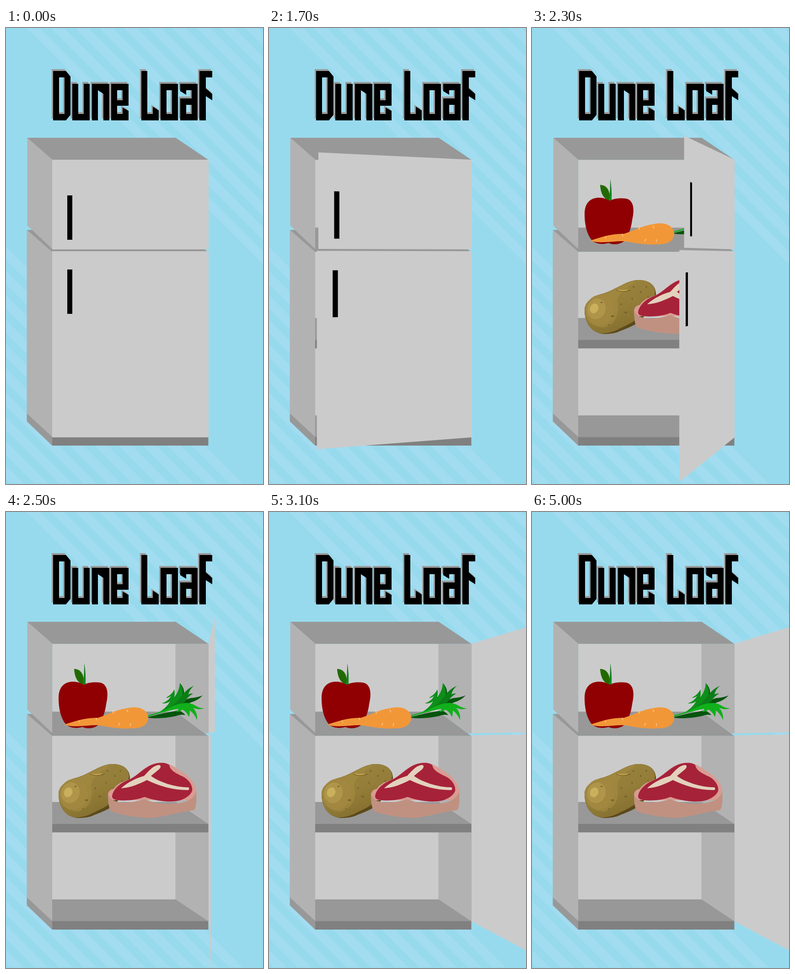
An HTML page without scripts that plays this animation: 562 px wide and 997 px high, repeating every 5.1 s.

```html
<!DOCTYPE html>
<html lang="en">
<head>
<meta charset="utf-8">
<title>Dune Loaf</title>
<style>
  html, body { margin: 0; width: 100%; height: 100%; overflow: hidden; background: #98daed; }
  .stage {
    position: relative; width: 562px; height: 997px; overflow: hidden;
    perspective: 1600px; perspective-origin: 281px 498.5px;
  }
  svg { position: absolute; left: 0; top: 0; display: block; }
  .door {
    position: absolute; left: 101px; width: 342px; background: #cbcbcb;
    transform-origin: 100% 50%;
  }
  .door i { position: absolute; left: 32.5px; width: 11.5px; height: 97px; background: #000; }
  .upper { top: 288px; height: 196px; animation: upper 5.1s infinite; }
  .upper i { top: 78px; }
  .lower { top: 488px; height: 407px; animation: lower 5.1s infinite; }
  .lower i { top: 40px; }

  /* doors swing at ten poses a second, then jump shut with the loop */
  @keyframes upper {
    0% { transform: rotateY(0deg); animation-timing-function: step-end; }
    29.41% { transform: rotateY(2.6deg); animation-timing-function: steps(12, end); }
    52.94% { transform: rotateY(102.7deg); animation-timing-function: step-end; }
    54.9%, 100% { transform: rotateY(108.5deg); }
  }
  @keyframes lower {
    0% { transform: rotateY(0deg); animation-timing-function: step-end; }
    29.41% { transform: rotateY(-.3deg); animation-timing-function: steps(12, end); }
    52.94% { transform: rotateY(101.9deg); animation-timing-function: step-end; }
    54.9%, 100% { transform: rotateY(110deg); }
  }

  .back { fill: #cbcbcb; }
  .side { fill: #b2b2b2; }
  .floor { fill: #989898; }
  .edge { fill: #808080; }
</style>
</head>
<body>
<div class="stage">
  <svg width="562" height="997" viewBox="0 0 562 997">
    <defs>
      <pattern id="rays" width="53.2" height="60" x="45" patternUnits="userSpaceOnUse" patternTransform="skewX(45)">
        <rect width="28.5" height="60" fill="#a2dcf0"/>
      </pattern>
      <linearGradient id="skin" x1="0" y1="0" x2=".55" y2="1">
        <stop offset="0" stop-color="#9c8541"/>
        <stop offset=".6" stop-color="#947d38"/>
        <stop offset="1" stop-color="#836e2f"/>
      </linearGradient>
      <linearGradient id="stem" x1="0" y1="0" x2="0" y2="1">
        <stop offset="0" stop-color="#0a6a1c"/>
        <stop offset="1" stop-color="#178a22"/>
      </linearGradient>
      <path id="D" d="M0 0H28L38 12V96L28 108H0ZM13 14V94H25V14Z"/>
      <path id="u" d="M0 28H13V94H25V28H38V108H0Z"/>
      <path id="n" d="M0 28H38V108H25V50L13 42V108H0Z"/>
      <path id="e" d="M0 28H38V76H13V94H25V80L38 87V108H0ZM13 42V64H25V42Z"/>
      <path id="L" d="M0 0H13V94H25V78L38 86V108H0Z"/>
      <path id="o" d="M0 28H38V108H0ZM13 42V94H25V42Z"/>
      <path id="a" d="M0 28H38V108H0V60H25V42H13V52L0 44ZM13 74V94H25V74Z"/>
      <path id="f" d="M0 0H28V14H14V38L28 50V64L14 55V108H0Z"/>
      <g id="word" fill-rule="evenodd">
        <use href="#D" x="103" y="94"/>
        <use href="#u" x="145" y="94"/>
        <use href="#n" x="188" y="94"/>
        <use href="#e" x="230" y="94"/>
        <use href="#L" x="296" y="94"/>
        <use href="#o" x="338" y="94"/>
        <use href="#a" x="381" y="94"/>
        <use href="#f" x="423" y="94"/>
      </g>
    </defs>

    <rect width="562" height="997" fill="#98daed"/>
    <path id="corner" d="M45 0H562V517Z" fill="url(#rays)"/>
    <use href="#corner" transform="rotate(180 281 498.500) translate(0 1.500)"/>

    <g role="img" aria-label="Dune Loaf">
      <use href="#word" x="-3" y="-4" fill="#999"/>
      <use href="#word"/>
    </g>

    <!-- upper box -->
    <path class="floor" d="M46.500 240H371L443 288.500H101Z"/>
    <path class="side" d="M46.500 240L101.500 288V485L46.500 432Z"/>
    <path class="back" d="M101.500 288.500H371V437H101.500Z"/>
    <path class="side" d="M370.500 288.500H443V484H435L370.500 436.500Z"/>
    <path class="floor" d="M101 436.500H370.500L442 489.500H101Z"/>

    <!-- lower box -->
    <path class="side" d="M45.500 442L101 488V895L45.500 843Z"/>
    <path class="floor" d="M45.500 441.500H57L102 484V489.500H101Z"/>
    <path class="floor" d="M45.500 842.500L101 894V913L45.500 860Z"/>
    <path class="back" d="M101 489.500H371V848H101Z"/>
    <path class="side" d="M370.500 489.500H443V895L370.500 847Z"/>
    <path class="floor" d="M101 634H371L443 682.500H101ZM101 847H371L443 895H101Z"/>
    <path class="edge" d="M101 682H442.500V700.500H101ZM101 894.500H442.500V913H101Z"/>

    <!-- apple -->
    <path fill="#900003" d="M170 377C152 367 115 365 115 407C115 434 122 456 133 466C145 474 157 473 167 470C178 475 192 473 200 467C211 455 217 437 219 420C224 400 224 377 206 373C193 371 180 373 170 377Z"/>
    <path fill="#226a00" d="M149 343C164 343 172 357 170 377C156 374 150 361 149 343Z"/>
    <path fill="url(#stem)" d="M171 330Q175 352 174 377L168.500 377Q171.500 352 171 330Z"/>

    <!-- carrot -->
    <g fill="#05540c">
      <path d="M311 448Q350 438 378 434Q388 438 392 444Q380 442 372 446Q340 453 311 450Z"/>
      <path d="M365 428Q385 412 402 407Q418 406 430 401Q420 412 405 416Q390 424 365 432Z"/>
      <path d="M370 420Q383 405 385 390Q384 381 380 374Q393 387 388 406Z"/>
    </g>
    <path fill="#0e8f1a" d="M330 440Q350 430 359 414Q349 420 341 418Q355 414 361 402Q355 407 350 406Q364 398 368 388Q370 395 368 405Q379 392 380 374Q390 388 385 405Q381 415 368 424Q350 436 330 440Z"/>
    <path fill="#0b7d17" d="M360 426Q378 412 386 400Q396 386 411 380Q401 388 399 399Q404 396 409 397Q396 405 392 414Q380 424 360 430Z"/>
    <path fill="#10b01b" d="M311 444Q345 436 365 424Q395 412 412 422Q424 430 434 429Q420 434 409 428Q419 438 418 455Q411 440 402 434Q402 443 400 448Q395 437 386 432Q380 437 372 437Q378 433 376 430Q345 437 311 447Z"/>
    <path fill="#f29738" d="M127 465C148 458 174 449 201 450C225 443 245 429 281 427C300 427 312 439 311 452C308 468 295 473 275 473C250 475 225 470 200 466C175 466 149 472 127 465Z"/>
    <path fill="none" stroke="#fbd5a4" stroke-width="1.300" d="M233 433L235 441M264 432L267 438M249 461L246 467M272 462V468M160 456L161 460M197 450L199 455"/>

    <!-- potato -->
    <path fill="#5c4a1b" d="M115 617C115 600 130 588 150 582C178 576 204 553 230 551C256 550 270 562 271 581C271 602 256 618 244 632C232 648 210 656 194 662C182 668 170 669 157 669C130 667 115 645 115 617Z"/>
    <path fill="url(#skin)" d="M115 617C115 600 130 588 150 582C178 576 204 553 230 551C254 550 267 560 269 576C268 598 250 613 238 626C225 643 207 650 192 657C180 664 168 667 154 668C130 666 115 645 115 617Z"/>
    <path fill="#a68c42" opacity=".6" d="M116 612C117 601 133 589 152 583C180 576 204 555 228 553C210 567 188 578 186 598C192 624 184 648 157 655C128 654 114 632 116 612Z"/>
    <ellipse cx="148" cy="617" rx="31" ry="34" fill="#a18740" transform="rotate(18 148 617)"/>
    <ellipse cx="141" cy="614" rx="20" ry="23" fill="#ae954a" transform="rotate(20 141 614)"/>
    <ellipse cx="136" cy="613" rx="9" ry="11" fill="#cab05c" transform="rotate(25 136 613)"/>
    <path fill="#c4a64e" d="M186 572Q200 574 211 571Q207 577 194 576Q187 576 186 572Z"/>
    <path fill="none" stroke="#69541f" stroke-width="1.200" d="M184 573Q198 579 216 573"/>
    <g fill="#7a652b">
      <ellipse cx="152" cy="600" rx="2.500" ry="1.500"/>
      <ellipse cx="195" cy="604" rx="1.500" ry="2.500"/>
      <ellipse cx="205" cy="622" rx="3.500" ry="2"/>
      <ellipse cx="176" cy="630" rx="3.500" ry="2"/>
      <ellipse cx="168" cy="649" rx="2" ry="1.300"/>
      <ellipse cx="219" cy="592" rx="1.500" ry="2.500"/>
      <ellipse cx="222" cy="566" rx="2.500" ry="1.500"/>
      <ellipse cx="238" cy="577" rx="1.500" ry="2.500"/>
      <ellipse cx="250" cy="566" rx="1.500" ry="2.500"/>
      <ellipse cx="254" cy="588" rx="1.500" ry="2"/>
    </g>

    <!-- steak -->
    <path fill="#d99b92" d="M223 617C225 609 229 607 236 605C243 594 254 590 268 585C291 576 305 549 338 548C352 548 366 554 379 565C396 574 414 590 416 610V630H224Z"/>
    <path fill="#c09181" d="M223 616C226 628 238 634 252 635C272 636 287 632 303 628C322 636 348 640 374 637C397 635 413 625 416 610C417 629 417 646 411 652C375 656 345 668 311 669C285 668 256 663 230 655C224 646 223 632 223 616Z"/>
    <path fill="#a62239" d="M232 622C233 609 246 594 268 585.500C291 577 305 550 338 548.500C347 548 353 550 357 553C359 565 371 571 386 578C400 585 409 598 407 610C402 622 385 632 365 633C340 634 320 629 303 623C285 630 262 632 245 630C236 629 232 626 232 622Z"/>
    <path fill="#e2d2bd" d="M252 604C264 592 284 582 302 577C311 568 320 555 334 553C341 554 338 560 333 564L317 577C334 590 369 602 399 602C402 605 400 609 396 608C365 608 335 599 308 586C291 595 271 603 252 604Z"/>
  </svg>

  <div class="door upper"><i></i></div>
  <div class="door lower"><i></i></div>
</div>
</body>
</html>
```
